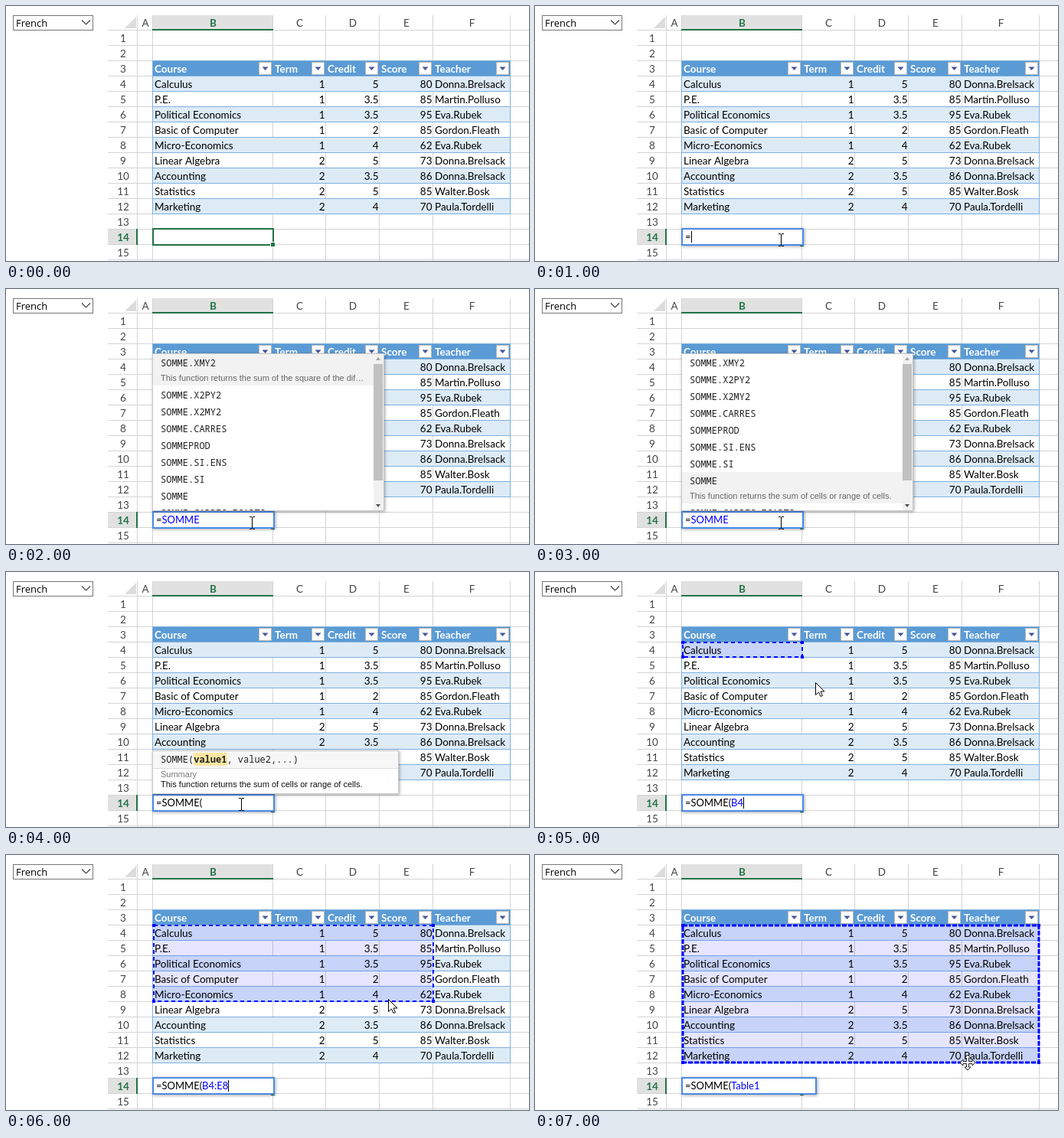
An HTML page with a canvas that plays this animation: 683x333 px, repeating every 8000 ms.

```html
<!DOCTYPE html>
<html lang="en">
<head>
<meta charset="utf-8">
<title>Spreadsheet formula entry</title>
<style>
html, body { margin: 0; width: 100%; height: 100%; overflow: hidden; background: #fff; }
canvas { display: block; }
</style>
</head>
<body>
<canvas id="stage" width="683" height="333"></canvas>
<script>
const ctx = document.getElementById('stage').getContext('2d');
const CELL = '13.5px Lato, sans-serif';
const CELL_BOLD = 'bold 13.5px Lato, sans-serif';
const EDIT = '13px Lato, sans-serif';
const MONO = '12px "Noto Sans Mono", monospace';
const MONO_BOLD = 'bold 12px "Noto Sans Mono", monospace';
const SMALL = '11px "Liberation Sans", sans-serif';
const GREEN = '#217346', GRID = '#d4d4d4', TABLE_LINE = '#7fb0dd', BLUE = '#0000ff';

const colX = [172, 192, 349, 418, 488, 558, 659];
const rowY = n => 12 + 20 * n;
const heads = ['Course', 'Term', 'Credit', 'Score', 'Teacher'];
const courses = [
  ['Calculus', 1, 5, 80, 'Donna.Brelsack'],
  ['P.E.', 1, 3.5, 85, 'Martin.Polluso'],
  ['Political Economics', 1, 3.5, 95, 'Eva.Rubek'],
  ['Basic of Computer', 1, 2, 85, 'Gordon.Fleath'],
  ['Micro-Economics', 1, 4, 62, 'Eva.Rubek'],
  ['Linear Algebra', 2, 5, 73, 'Donna.Brelsack'],
  ['Accounting', 2, 3.5, 86, 'Donna.Brelsack'],
  ['Statistics', 2, 5, 85, 'Walter.Bosk'],
  ['Marketing', 2, 4, 70, 'Paula.Tordelli']
];
const functions = ['SOMME.XMY2', 'SOMME.X2PY2', 'SOMME.X2MY2', 'SOMME.CARRES',
  'SOMMEPROD', 'SOMME.SI.ENS', 'SOMME.SI', 'SOMME', 'SOMME.CARRES.ECARTS'];
const SUM_HELP = 'This function returns the sum of cells or range of cells.';

// One entry per second.
const steps = [
  {},
  { formula: ['=', ''], caret: true, pointer: [ibeam, 321, 305] },
  { formula: ['=', 'SOMME'], list: [0, 'This function returns the sum of the square of the dif…'],
    pointer: [ibeam, 321, 305] },
  { formula: ['=', 'SOMME'], list: [7, SUM_HELP], pointer: [ibeam, 321, 305] },
  { formula: ['=SOMME(', ''], hint: true, pointer: [ibeam, 307, 303] },
  { formula: ['=SOMME(', 'B4'], caret: true, range: [349, 111], pointer: [arrow, 366, 144] },
  { formula: ['=SOMME(', 'B4:E8'], caret: true, range: [558, 191], pointer: [arrow, 499, 188] },
  { formula: ['=SOMME(', 'Table1'], editRight: 368, range: [658, 271], dense: true,
    pointer: [moveCross, 565, 271] }
];

function rect(x, y, w, h, color) {
  ctx.fillStyle = color;
  ctx.fillRect(x, y, w, h);
}

function frame(x, y, w, h, color, width = 1) {
  ctx.strokeStyle = color;
  ctx.lineWidth = width;
  ctx.strokeRect(x + width / 2, y + width / 2, w - width, h - width);
}

function text(s, x, y, font = CELL, color = '#000', align = 'left') {
  ctx.font = font;
  ctx.fillStyle = color;
  ctx.textAlign = align;
  ctx.fillText(s, x, y);
  return ctx.measureText(s).width;
}

function path(points, fill, stroke, width = 1, close = true) {
  ctx.beginPath();
  points.forEach(([x, y]) => ctx.lineTo(x, y));
  if (close) ctx.closePath();
  if (fill) { ctx.fillStyle = fill; ctx.fill(); }
  if (stroke) { ctx.strokeStyle = stroke; ctx.lineWidth = width; ctx.stroke(); }
}

function panel(x, y, w, h, color = '#c8c8c8', border = 1) {
  ctx.save();
  ctx.shadowColor = 'rgba(0,0,0,.35)';
  ctx.shadowBlur = 4;
  ctx.shadowOffsetX = ctx.shadowOffsetY = 1;
  rect(x, y, w, h, '#fff');
  ctx.restore();
  frame(x, y, w, h, color, border);
}

function drawSelect() {
  frame(9, 12, 105, 20, '#767676');
  text('French', 13, 27, '13px "Open Sans", sans-serif');
  path([[99, 18.5], [104.5, 24], [110, 18.5]], null, '#444', 1.2, false);
}

// Each cell owns the grid line on its right and bottom edge.
function drawGrid() {
  rect(192, 12, 157, 19, '#e1e1e1');
  rect(133, 292, 39, 19, '#e1e1e1');
  for (let n = 1; n <= 16; n++) rect(133, rowY(n) - 1, 550, 1, GRID);
  colX.forEach(x => rect(x - 1, 12, 1, 321, GRID));
  path([[170, 14], [170, 29], [155, 29]], '#dcdcdc');
  rect(191, 30, 158, 2, GREEN);
  rect(170, 291, 2, 21, GREEN);
  [...'ABCDEF'].forEach((c, i) => {
    const mid = (colX[i] + colX[i + 1]) / 2;
    text(c, mid, 27, c === 'B' ? CELL_BOLD : CELL, c === 'B' ? GREEN : '#444', 'center');
  });
  for (let n = 1; n <= 15; n++) {
    text(n, 153, rowY(n) + 15, n === 14 ? CELL_BOLD : CELL, n === 14 ? GREEN : '#444', 'center');
  }
}

function drawTable() {
  rect(192, 72, 467, 20, '#5b9bd5');
  heads.forEach((head, i) => {
    text(head, colX[i + 1] + 2, 87, CELL_BOLD, '#fff');
    const x = colX[i + 2] - 19;
    rect(x, 73, 17, 17, '#fff');
    frame(x, 73, 17, 17, '#b8b8b8');
    path([[x + 4.5, 79.5], [x + 12.5, 79.5], [x + 8.5, 84]], '#44549a');
  });
  courses.forEach((_, i) => {
    if (i % 2 === 0) rect(192, rowY(i + 4), 467, 20, '#ddebf7');
  });
  for (let n = 3; n <= 13; n++) rect(191, rowY(n) - 1, 468, 1, TABLE_LINE);
  rect(191, 71, 1, 201, TABLE_LINE);
  rect(658, 71, 1, 201, TABLE_LINE);
}

function drawTableText() {
  courses.forEach((row, r) => row.forEach((value, i) => {
    const isNumber = typeof value === 'number';
    const x = isNumber ? colX[i + 2] - 1.5 : colX[i + 1] + 2;
    text(value, x, rowY(r + 4) + 15, CELL, '#000', isNumber ? 'right' : 'left');
  }));
}

function drawRange([right, bottom], dense) {
  const left = 193, top = 92;
  rect(left, top, right - left, bottom - top, 'rgba(0,0,255,.1)');
  ctx.save();
  ctx.setLineDash(dense ? [6, 2] : [5, 4]);
  ctx.strokeStyle = BLUE;
  ctx.lineWidth = dense ? 3 : 2;
  ctx.strokeRect(left, top, right - left, bottom - top);
  ctx.restore();
  for (const x of [left, right]) {
    for (const y of [top, bottom]) rect(x - 2, y - 2, 4, 4, BLUE);
  }
}

function drawHandle() {
  rect(345, 308, 6, 6, '#fff');
  rect(346, 309, 5, 5, GREEN);
}

function drawActiveCell() {
  frame(191, 290, 159, 23, GREEN, 2);
  drawHandle();
}

function drawEditor({ formula: [plain, colored], editRight = 351, caret }) {
  drawHandle();
  panel(191, 290, editRight - 191, 23, '#4a8ae8', 2);
  let x = 196;
  x += text(plain, x, 306, EDIT);
  x += text(colored, x, 306, EDIT, BLUE);
  if (caret) rect(Math.round(x), 294, 1, 15, '#000');
}

function drawList([selected, help]) {
  panel(191, 84, 303, 206);
  ctx.save();
  ctx.beginPath();
  ctx.rect(192, 85, 301, 204);
  ctx.clip();
  let y = 85;
  functions.forEach((name, i) => {
    const chosen = i === selected;
    if (chosen) rect(192, y, 288, 41, '#f2f2f2');
    text(name, 202, y + 16, MONO, '#222');
    if (chosen) text(help, 202, y + 35, SMALL, '#666');
    y += chosen ? 42 : 22;
  });
  rect(480, 85, 13, 204, '#f1f1f1');
  rect(480, 98, 12, 152, '#c1c1c1');
  path([[483, 93], [489, 93], [486, 89]], '#a3a3a3');
  path([[483, 281], [489, 281], [486, 285]], '#505050');
  ctx.restore();
}

function drawHint() {
  panel(191, 233, 322, 57);
  rect(192, 234, 320, 22, '#f7f7f7');
  rect(192, 256, 320, 1, '#dcdcdc');
  rect(245, 236, 44, 17, '#fbe7a3');
  let x = 202;
  x += text('SOMME(', x, 249, MONO, '#222');
  x += text('value1', x, 249, MONO_BOLD, '#222');
  text(', value2,...)', x, 249, MONO, '#222');
  text('Summary', 202, 268, SMALL, '#777');
  text(SUM_HELP, 202, 281, SMALL, '#111');
}

function ibeam(x, y) {
  rect(x, y - 7, 1, 15, '#000');
  for (const edge of [-8, 8]) {
    rect(x - 3, y + edge, 3, 1, '#000');
    rect(x + 1, y + edge, 3, 1, '#000');
  }
}

function arrow(x, y) {
  const shape = [[0, 0], [0, 16], [4, 12.5], [6.5, 18], [9, 17], [6.5, 11.5], [11.5, 11.5]];
  path(shape.map(([dx, dy]) => [x + dx + .5, y + dy + .5]), '#fff', '#000');
}

function moveCross(x, y) {
  const arm = [[-1.5, -1.5], [-1.5, -6], [-4, -6], [0, -10], [4, -6], [1.5, -6]];
  const turn = ([dx, dy], k) => k ? turn([-dy, dx], k - 1) : [x + dx, y + dy];
  path([0, 1, 2, 3].flatMap(k => arm.map(p => turn(p, k))), '#fff', '#222');
}

function draw(step) {
  rect(0, 0, 683, 333, '#fff');
  drawSelect();
  drawGrid();
  drawTable();
  if (step.range) drawRange(step.range, step.dense);
  drawTableText();
  if (step.formula) drawEditor(step);
  else drawActiveCell();
  if (step.list) drawList(step.list);
  if (step.hint) drawHint();
  if (step.pointer) {
    const [shape, x, y] = step.pointer;
    shape(x, y);
  }
}

const start = performance.now();
function tick() {
  const elapsed = performance.now() - start;
  draw(steps[Math.floor(elapsed / 1000) % steps.length]);
  requestAnimationFrame(tick);
}
tick();
</script>
</body>
</html>
```
